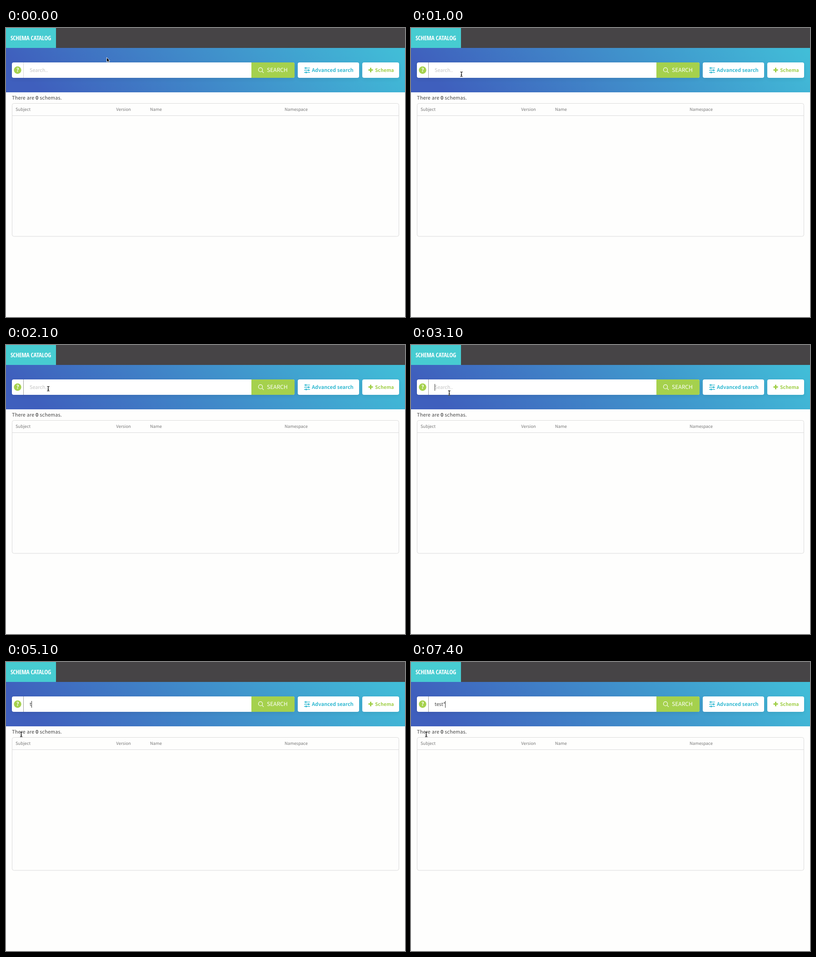
An HTML page for the animation above (8 s loop, 878x638 px).

```html
<!DOCTYPE html>
<html lang="en">
<head>
<meta charset="utf-8">
<title>Schema catalog</title>
<style>
  html, body { margin: 0; width: 100%; height: 100%; overflow: hidden; background: #fefefd; }
  .stage { position: relative; width: 878px; height: 638px; overflow: hidden; }
  .banner {
    position: absolute; top: 44px; width: 878px; height: 97.5px;
    background: linear-gradient(45deg, #3f5fbd 8%, #41bfd8);
  }
  .box {
    position: absolute; top: 76px; height: 34px; border-radius: 4px;
    background: #fff; box-shadow: 0 3px 8px #00000014; overflow: hidden;
  }
  .box i { position: absolute; left: 527px; right: 0; height: 100%; background: #a5d14d; }
  svg { position: absolute; inset: 0; }
  text {
    font: 10.75px "Noto Sans CJK SC", "Noto Sans CJK JP", "Noto Sans CJK", "Noto Sans", sans-serif;
    text-rendering: geometricPrecision; fill: #444;
  }
  #title {
    font: 15px "Open Sans Condensed", "Open Sans", sans-serif;
    font-stretch: 75%; letter-spacing: -.02em; fill: #fff;
  }
  .head text { font-size: 9.35px; fill: #777; }
  .button { font-size: 11.1px; font-weight: 700; }
</style>
</head>
<body>
<div class="stage">
  <div class="banner"></div>
  <div class="box" style="left:13px;width:621.5px"><i></i></div>
  <div class="box" style="left:642px;width:135px"></div>
  <div class="box" style="left:784px;width:81px"></div>

  <svg width="878" height="638" viewBox="0 0 878 638" fill="none">
    <path d="M0 0H878V44H0z" fill="#464446"/>
    <path d="M0 0H110V44H0z" fill="#47ccd1"/>
    <text id="title" x="10" y="27.3">SCHEMA CATALOG</text>

    <circle cx="25.5" cy="93" r="8.2" fill="#a5d14d"/>
    <text x="25.5" y="97.3" text-anchor="middle" style="font-size:12px;font-weight:700;fill:#fff">?</text>
    <path id="divider" d="M38.5 76V110"/>
    <text id="query" x="52" y="96.6"></text>
    <path id="caret" d="M0 86V101" stroke="#333"/>

    <g stroke="#fff" stroke-width="1.2">
      <circle cx="560" cy="92.2" r="4.5"/>
      <path d="M563.2 95.4L567 99.2"/>
    </g>
    <text x="574" y="97.3" style="font-size:12.1px;fill:#fff">SEARCH</text>

    <g stroke="#35bad2">
      <path d="M656 88.4H669M656 93.2H669M656 98H669" stroke-width="1.4"/>
      <path d="M659.7 86.4V90.4M665.6 91.2V95.2M660.5 96V100" stroke-width="2.4"/>
    </g>
    <text class="button" x="673" y="96.6" style="fill:#35bad2">Advanced search</text>

    <path d="M797.5 92.7H807.5M802.5 87.7V97.7" stroke="#a0cf48" stroke-width="3"/>
    <text class="button" x="812" y="96.6" style="fill:#a0cf48;font-size:10.6px">Schema</text>

    <text x="13" y="158" letter-spacing=".22">There are <tspan font-weight="700">0</tspan> schemas.</text>
    <g stroke="#dadada">
      <rect x="13.5" y="166.5" width="851" height="293.5" rx="4"/>
      <path d="M13.5 193.5H864.5"/>
    </g>
    <g class="head">
      <text x="21" y="183.2">Subject</text>
      <text x="242.5" y="183.2">Version</text>
      <text x="317" y="183.2">Name</text>
      <text x="613" y="183.2">Namespace</text>
    </g>

    <path id="arrow" d="M0 0V10L2.4 8L4 11.4L5.7 10.6L4.2 7.4H7z" fill="#000" stroke="#fff" stroke-width=".9"/>
    <defs>
      <path id="bar" d="M-2.5-5Q0-5 0-4Q0-5 2.5-5M0-4V4M-2.5 5Q0 5 0 4Q0 5 2.5 5M-1.2 1.5H1.2"/>
    </defs>
    <g id="beam">
      <use href="#bar" stroke="#fff8" stroke-width="2.4"/>
      <use href="#bar" stroke="#111" stroke-width="1.3"/>
    </g>
  </svg>
</div>
<script>
  const [title, divider, query, caret, arrow, beam] =
    ["title", "divider", "query", "caret", "arrow", "beam"].map(id => document.getElementById(id));

  // The tab sets the title's size, whichever width of the typeface is installed.
  title.style.fontSize = `${15 * 89 / title.getComputedTextLength()}px`;

  const word = "test*", focusTime = 1500, keyTimes = [5100, 5200, 5400, 5600, 6200];
  const blinkTime = 600;

  // Cubic ease-in-out progress from start to end.
  function glide(t, start, end) {
    const p = Math.min(1, Math.max(0, (t - start) / (end - start)));
    return p < 0.5 ? 4 * p ** 3 : 1 - 4 * (1 - p) ** 3;
  }

  function pointerAt(t) {
    const reach = glide(t, 300, 800), settle = glide(t, 1000, 1300), leave = glide(t, 3000, 3300);
    return [
      221.5 - 110.5 * reach - 18 * settle - 59.5 * leave,
      65 + 37 * reach - 5.5 * settle + 63.5 * leave
    ];
  }

  const show = (node, on) => node.setAttribute("visibility", on ? "visible" : "hidden");

  function draw(now) {
    const t = Math.floor(now % 8000 / 100) * 100;

    const [x, y] = pointerAt(t), overInput = y > 76;
    for (const node of [arrow, beam]) node.setAttribute("transform", `translate(${x} ${y})`);
    show(arrow, !overInput);
    show(beam, overInput);
    divider.setAttribute("stroke", overInput ? "#999" : "#d6d6d6");

    const value = word.slice(0, keyTimes.filter(key => key <= t).length);
    query.textContent = value || "Search..";
    query.style.fill = value ? "#444" : "#c4c4c4";

    // Focus and every key press restart the blinking.
    const lastInput = [focusTime, ...keyTimes].findLast(time => time <= t);
    const width = value ? query.getComputedTextLength() : 0;
    caret.setAttribute("transform", `translate(${52.5 + Math.floor(width + 0.2)})`);
    show(caret, Math.floor((t - lastInput) / blinkTime) % 2 === 0);

    requestAnimationFrame(draw);
  }
  requestAnimationFrame(draw);
</script>
</body>
</html>
```
